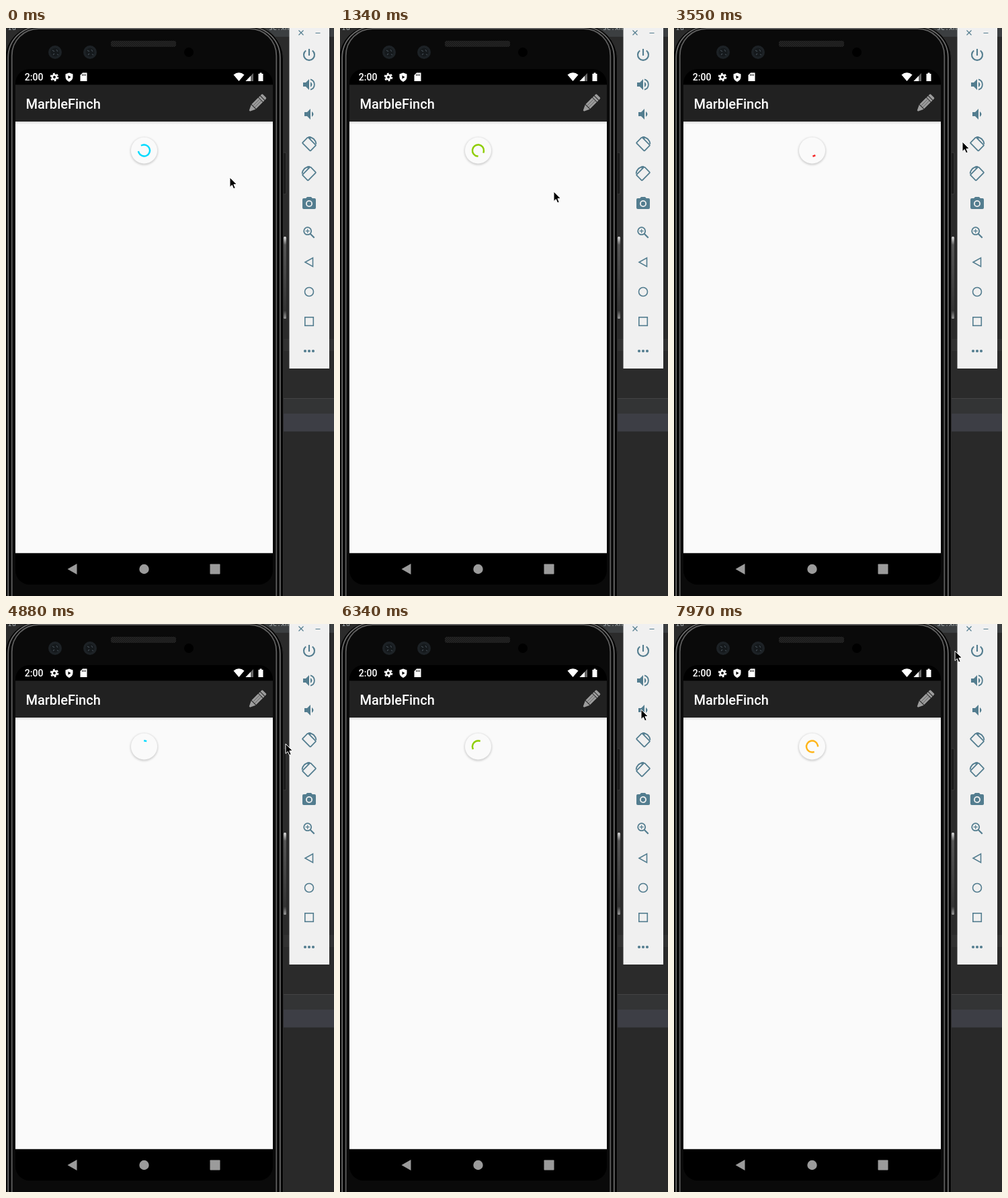
These frames come from a looping animation (488 by 844 pixels, 8000 ms). An HTML page:

```html
<!DOCTYPE html>
<html lang="en">
<head>
<meta charset="utf-8">
<title>Loading timeline</title>
<style>
  html, body { margin: 0; width: 100%; height: 100%; overflow: hidden; background: #2b2b2b; }
  svg { display: block; width: 100%; height: 100%; }
  text { font-family: Roboto, sans-serif; font-weight: 500; fill: #fff; }
  .code { font: 10px "Noto Sans Mono", monospace; fill: #a9b0b5; }
  .line { fill: none; stroke: #537d8f; stroke-width: 1.8; }
  .thin { stroke-width: 1.2; }
  .bold { stroke-width: 2.1; }
  .solid { fill: #537d8f; }
</style>
</head>
<body>
<svg viewBox="0 0 488 844">
  <defs>
    <linearGradient id="barShadow" x2="0" y2="1">
      <stop stop-color="#d8d8d8"/><stop offset="1" stop-color="#fafafa"/>
    </linearGradient>
    <linearGradient id="sideKey" x2="0" y2="1">
      <stop stop-color="#ddd"/><stop offset=".1" stop-color="#555"/>
      <stop offset=".9" stop-color="#333"/><stop offset="1" stop-color="#999"/>
    </linearGradient>
    <pattern id="mesh" width="3" height="3" patternUnits="userSpaceOnUse">
      <rect width="3" height="3" fill="#262626"/><path d="M0 3L3 0" stroke="#111"/>
    </pattern>
    <filter id="soft" x="-30%" y="-30%" width="160%" height="160%"><feGaussianBlur stdDeviation="1.6"/></filter>
    <clipPath id="screen"><rect x="14" y="61" width="383" height="766" rx="21"/></clipPath>
    <g id="lens">
      <circle r="10" fill="#1d2226"/><circle r="6.5" fill="#15191c"/>
      <path d="M-4-3l3 2M2-4l2 3M-3 4l2-2M3 3l2 1" stroke="#3f484f" stroke-width="1.2"/>
    </g>
    <g id="turn">
      <rect x="-6" y="-8.5" width="12" height="17" rx="1" transform="rotate(-45)" class="line"/>
      <path d="M-1-10.5Q9-10 10.5 0" class="line"/>
      <path d="M-2-10.5l4.5-1v4z" class="solid"/>
    </g>
  </defs>

  <!-- editor window behind the phone -->
  <rect width="488" height="844" fill="#2b2b2b"/>
  <rect x="380" width="108" height="13" fill="#3c3f41"/>
  <text class="code" x="3" y="3">ra</text>
  <text class="code" x="391" y="3">se.xn</text>
  <rect x="410" y="462" width="78" height="18" fill="#323232"/>
  <rect x="410" y="550" width="78" height="23" fill="#333435"/>
  <path d="M410 550.5h78" stroke="#444"/>
  <rect x="410" y="573" width="78" height="26.5" fill="#3d3e45"/>
  <rect x="410" y="600" width="78" height="244" fill="#292929"/>

  <!-- phone body -->
  <rect x="412" y="185" width="5" height="62" rx="2" fill="#1c1c1c" stroke="#3a3a3a"/>
  <rect x="413" y="310" width="4" height="122" rx="1.5" fill="url(#sideKey)"/>
  <rect x="-1.500" y="-4" width="414" height="900" rx="50" fill="#050505" stroke="#2f2f2f"/>
  <rect x="3.200" y="-2" width="404.600" height="900" rx="46" fill="none" stroke="#6b6b6b" stroke-width="1.800"/>
  <rect x="8.700" y="1" width="393.600" height="900" rx="40" fill="#0a0a0a" stroke="#5e5e5e" stroke-width="1.800"/>
  <rect x="156" y="19" width="97" height="9" rx="3" fill="url(#mesh)"/>
  <use href="#lens" x="73" y="36"/>
  <use href="#lens" x="125" y="36"/>
  <circle cx="272" cy="36" r="7" fill="#000"/>

  <!-- screen -->
  <g clip-path="url(#screen)">
    <rect x="14" y="61" width="383" height="766" fill="#000"/>
    <rect x="14" y="84.300" width="383" height="54.700" fill="#212121"/>
    <rect x="14" y="139" width="383" height="641.300" fill="#fafafa"/>
    <rect x="14" y="139" width="383" height="4" fill="url(#barShadow)"/>
  </g>
  <text x="27.800" y="78" font-size="14">2:00</text>
  <g fill="#fff">
    <circle cx="72" cy="73" r="3.200" fill="none" stroke="#fff" stroke-width="2.600"/>
    <circle cx="72" cy="73" r="5.300" fill="none" stroke="#fff" stroke-width="2" stroke-dasharray="2.800 2.750"/>
    <path d="M94 66.500l5.500 2v4q0 5-5.500 7.500-5.500-2.500-5.500-7.500v-4z"/>
    <path d="M92.500 70.500l4 2.500-4 2.500z" fill="#000"/>
    <path d="M114 66.500h6.500v12.500h-10v-9z"/>
    <path d="M113.700 68.500v2.500m2.200-2.500v2.500m2.200-2.500v2.500" stroke="#000"/>
    <path d="M338.500 69.500q8-6.500 16 0l-8 9.500z"/>
    <path d="M356.500 79l11.500-12v12z" opacity=".4"/>
    <path d="M356.500 79l7.500-7.800v7.800z"/>
    <path d="M377.500 66.500h3v1.500h2v11h-7v-11h2z"/>
  </g>
  <text x="29.500" y="120" font-size="20">MarbleFinch</text>
  <g transform="translate(373.500 112) rotate(45) scale(.95)" fill="#9c9c9c">
    <path d="M-5-12.500v-2q0-2 2-2h6q2 0 2 2v2zM-5-11.500H5v3H-5zM-5-7.500H5V7H-5zM-5 8H5L1 16.500h-2z"/>
    <path d="M-1.700-7.500V7M1.700-7.500V7" stroke="#555" stroke-width=".8"/>
  </g>
  <g fill="#9b9b9b">
    <path d="M91.500 804l14-8v16z"/>
    <circle cx="205.500" cy="804" r="7.200"/>
    <rect x="303.500" y="796.500" width="15" height="15" rx=".8"/>
  </g>

  <!-- refresh indicator -->
  <circle cx="205.500" cy="183" r="20.500" fill="#000" opacity=".17" filter="url(#soft)"/>
  <circle cx="205.500" cy="182" r="19.600" fill="#fafafa"/>
  <circle id="ring" r="8.500" pathLength="1" fill="none" stroke-width="2.450" stroke-linecap="square"/>

  <!-- emulator toolbar -->
  <rect x="421.500" width="59.500" height="506" fill="#f0f0f0"/>
  <path d="M435.500 3.500l7 7m0-7l-7 7M460.500 7.500h7" class="line thin"/>
  <path d="M451 31v10M446.200 33.500a8 8 0 1 0 9.600 0" class="line bold"/>
  <g transform="translate(451 84)">
    <path d="M-9-3h4l5-5V8l-5-5h-4z" class="solid"/>
    <path d="M2-4q5 4 0 8z" class="solid"/>
    <path d="M2-7.700a8 8 0 0 1 0 15.400" class="line"/>
  </g>
  <path d="M444 125h4l5-5v16l-5-5h-4zM455 124q5 4 0 8z" class="solid"/>
  <use href="#turn" transform="translate(451 172.500)"/>
  <use href="#turn" transform="translate(451 216.500) scale(-1 1)"/>
  <g transform="translate(451 260)" class="solid">
    <path d="M-3-9H3L4.800-7H8q2 0 2 2V7q0 2-2 2H-8q-2 0-2-2V-5q0-2 2-2h3.200z"/>
    <circle cy="1" r="5" fill="#f0f0f0"/>
    <circle cy="1" r="3.200"/>
  </g>
  <g transform="translate(448.700 301.700)" class="line">
    <circle r="5.500"/><path d="M4 4l6 6" class="bold"/>
    <path d="M-3 0h6M0-3v6" class="thin"/>
  </g>
  <g class="line" style="stroke-width:1.6">
    <path d="M445 348l11.500-6.500v13z"/>
    <circle cx="451" cy="392" r="6.500"/>
    <rect x="444.800" y="429.800" width="12.500" height="12.500"/>
  </g>
  <g class="solid">
    <circle cx="445" cy="480" r="2.100"/><circle cx="451" cy="480" r="2.100"/><circle cx="457" cy="480" r="2.100"/>
  </g>

  <path id="cursor" d="M0 0V14.500l3.300-3 2.300 5.300 2.600-1.100-2.300-5.200h4.500z" fill="#000" stroke="#fff" stroke-width="1" stroke-linejoin="round"/>
</svg>

<script>
const LOOP = 8000, STEP = 147.4;
const CYCLE = 1332, PHASE = 0.392;    // one spinner cycle and where the loop enters it
const MIN_ARC = 0.01, GROWTH = 0.79;
const START_TURN = 0.365, TURN_PER_CYCLE = 1.59, DRIFT = 0.81;
const COLORS = [[0, 219, 255], [142, 205, 0], [255, 181, 24], [245, 38, 38]];

// step, x, y
const CURSOR_PATH = [
  [0, 333, 222], [9, 318, 243], [13, 372, 165], [15, 426, 82], [16, 405, 67],
  [17, 382, 105], [21, 432, 235], [24, 429, 169], [28, 421, 124], [32, 416, 178],
  [33, 416, 178], [37, 455, 271], [40, 453, 205], [43, 448, 127], [46, 428, 62],
  [48, 415, 80], [54, 418, 40]
];

const ring = document.getElementById('ring');
const cursor = document.getElementById('cursor');
const mix = (a, b, k) => a + (b - a) * k;

// cubic-bezier(.4, 0, .2, 1)
function fastOutSlowIn(x) {
  let lo = 0, hi = 1;
  for (let i = 0; i < 20; i++) {
    const s = (lo + hi) / 2, r = 1 - s;
    if (1.2 * r * r * s + 0.6 * r * s * s + s ** 3 < x) lo = s; else hi = s;
  }
  return 3 * (1 - lo) * lo * lo + lo ** 3;
}

function drawRing(time) {
  const progress = time / CYCLE + PHASE;
  const cycle = Math.floor(progress), t = progress - cycle;
  const head = GROWTH * fastOutSlowIn(Math.min(1, t * 2));
  const tail = GROWTH * fastOutSlowIn(Math.max(0, t * 2 - 1));
  const arc = head - tail + MIN_ARC;
  const turn = START_TURN + cycle * TURN_PER_CYCLE + DRIFT * t + tail;
  const next = COLORS[(cycle + 1) % 4], blend = Math.max(0, (t - 0.75) * 4);
  const rgb = COLORS[cycle % 4].map((c, i) => Math.round(mix(c, next[i], blend)));
  ring.setAttribute('stroke', `rgb(${rgb})`);
  ring.setAttribute('stroke-dasharray', `${arc} 2`);
  ring.setAttribute('transform', `translate(205.5 182) rotate(${turn * 360 % 360})`);
}

function drawCursor(step) {
  const i = Math.max(1, CURSOR_PATH.findIndex(p => p[0] >= step));
  const [s0, x0, y0] = CURSOR_PATH[i - 1], [s1, x1, y1] = CURSOR_PATH[i];
  const k = (step - s0) / (s1 - s0);
  cursor.setAttribute('transform', `translate(${mix(x0, x1, k)} ${mix(y0, y1, k)})`);
}

function draw(now) {
  const step = Math.min(54, Math.floor(now % LOOP / STEP));
  drawRing(step * 147.7);
  drawCursor(step);
  requestAnimationFrame(draw);
}
draw(performance.now());
</script>
</body>
</html>
```
